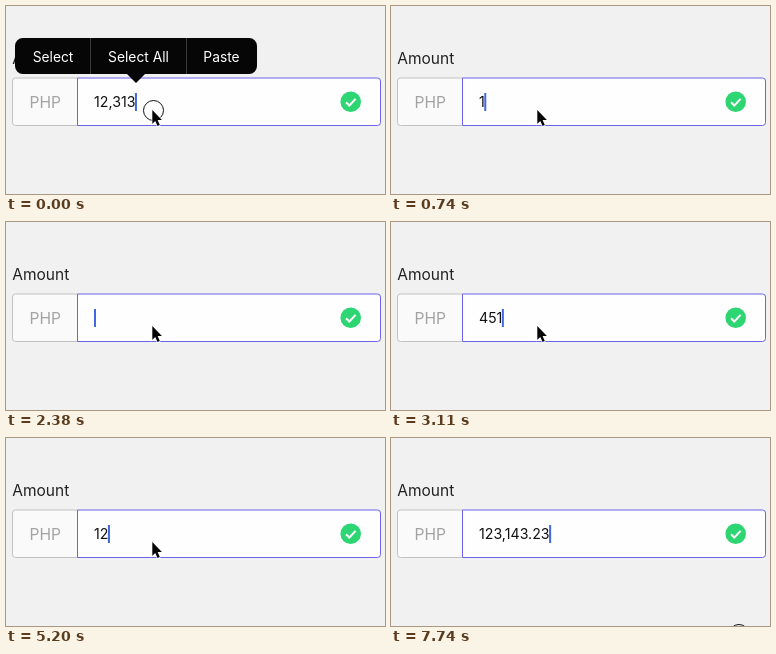
Write an HTML page that moves like this. It is 379 px wide and 188 px high and loops after 7840 ms.

```html
<!DOCTYPE html>
<html lang="en">
<head>
<meta charset="utf-8">
<title>Amount field</title>
<style>
  html, body { margin: 0; width: 100%; height: 100%; overflow: hidden; background: #f1f1f1; }
  svg { display: block; width: 379px; height: 188px; font-family: Inter, "Liberation Sans", sans-serif; }
  #menu text { font-size: 13.8px; fill: #fff; text-anchor: middle; }
</style>
</head>
<body>
<svg viewBox="0 0 379 188">
  <rect width="379" height="188" fill="#f1f1f1"/>
  <text x="6.3" y="57.6" font-size="15.5" fill="#222">Amount</text>

  <path d="M71.5 72H9.5a3 3 0 0 0-3 3v41.5a3 3 0 0 0 3 3h62z" fill="#fafafa" stroke="#c2c2c2"/>
  <text x="39.3" y="101.5" font-size="15.6" fill="#a3a3a3" text-anchor="middle">PHP</text>
  <path d="M71.5 72h300a3 3 0 0 1 3 3v41.5a3 3 0 0 1-3 3h-300z" fill="#fefefe" stroke="#6c63ec"/>

  <circle cx="344.7" cy="95.8" r="10.3" fill="#2dd573"/>
  <path d="M340 96.2l3.3 3.3 6.3-6.6" fill="none" stroke="#fff" stroke-width="2"/>

  <text id="value" x="88" y="101" font-size="14.2" fill="#111"></text>
  <rect id="caret" y="87" width="2" height="18" fill="#4069df"/>

  <g id="menu">
    <path d="M17 32H243a8 8 0 0 1 8 8V60a8 8 0 0 1-8 8H139l-9 9-9-9H17a8 8 0 0 1-8-8V40a8 8 0 0 1 8-8z" fill="#060606"/>
    <path d="M84.5 32v36M180.5 32v36" stroke="#3a3a3a"/>
    <text x="47" y="55.5">Select</text>
    <text x="132.5" y="55.5">Select All</text>
    <text x="215.5" y="55.5">Paste</text>
  </g>

  <g id="pointer">
    <circle id="ring" cx="1.2" cy="0.5" r="10" fill="none" stroke="#111"/>
    <path d="M0 0v13.8l3-2.9 2.2 5.1 2.3-1-2.2-4.9h4.3z" fill="#050505" stroke="#fff" stroke-width="1.4" paint-order="stroke"/>
  </g>
</svg>
<script>
  const LOOP = 7840, STEP = 148;
  const $ = id => document.getElementById(id);
  const value = $("value"), caret = $("caret"), menu = $("menu"), pointer = $("pointer"), ring = $("ring");

  // [start ms, text, caret visible]
  const typing = [
    [0, "12,313", 1], [440, "1,231", 1], [590, "12", 1], [740, "1", 1], [880, "", 1],
    [1330, "", 0], [1780, "", 1], [2680, "4", 1], [2820, "45", 1],
    [3110, "451", 1], [3260, "45,121", 1], [3860, "4,512", 1], [4150, "451", 1],
    [4300, "45", 1], [4600, "4", 1], [4750, "", 1], [5200, "12", 1], [5350, "123", 1],
    [5490, "12,314", 1], [5640, "123,143", 1], [6240, "123,143", 0],
    [6540, "123,143.", 1], [6690, "123,143.2", 1], [6840, "123,143.23", 1]
  ];

  // [ms, x, y]
  const path = [[0, 146.3, 104], [6240, 146.3, 104], [7140, 308, 176], [7290, 325, 192], [7740, 346.8, 196], [LOOP, 346.8, 196]];

  function pointerAt(t) {
    const i = path.findIndex(p => p[0] > t);
    const a = path[i - 1], b = path[i];
    const k = (t - a[0]) / (b[0] - a[0]);
    const e = k * k * (3 - 2 * k);
    return [a[1] + (b[1] - a[1]) * e, a[2] + (b[2] - a[2]) * e];
  }

  function draw(t) {
    const [, text, on] = typing.filter(s => s[0] <= t).pop();
    if (value.textContent !== text) value.textContent = text;
    caret.setAttribute("x", 88 + (text ? value.getComputedTextLength() - 0.5 : 0));
    caret.setAttribute("opacity", on);
    menu.setAttribute("opacity", t < 140 ? 1 : t < 290 ? 0.5 : 0);
    const held = t >= 7740 ? 7740 : Math.floor((t + 8) / STEP) * STEP;
    pointer.setAttribute("transform", `translate(${pointerAt(held)})`);
    ring.setAttribute("opacity", t < 140 || t >= 7740 ? 1 : 0);
  }

  const start = performance.now();
  function tick() {
    draw((performance.now() - start) % LOOP);
    requestAnimationFrame(tick);
  }
  tick();
</script>
</body>
</html>
```
